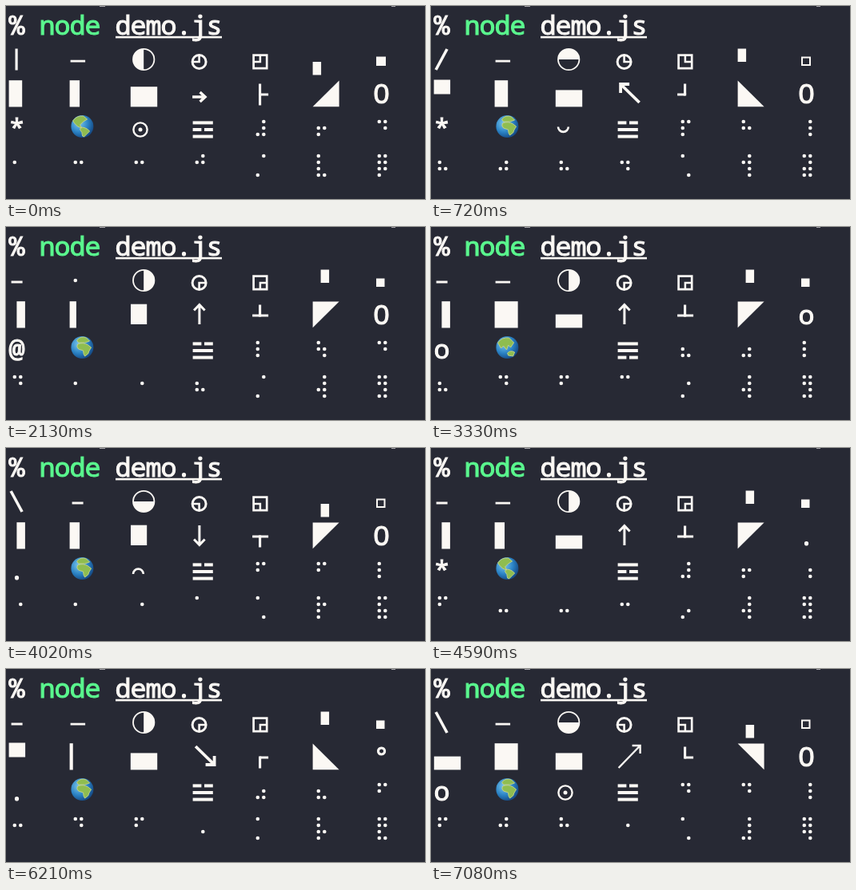
An HTML page for the animation above (7.2 s loop, 524 by 242 pixels).

```html
<!DOCTYPE html>
<html lang="en">
<head>
<meta charset="utf-8">
<title>Terminal spinners</title>
<style>
  html, body { margin: 0; width: 100%; height: 100%; overflow: hidden; background: #272934; }
  svg { display: block; width: 524px; height: 242px; }
  text {
    font: 33.4px "Noto Sans Mono", "DejaVu Sans Mono", monospace; letter-spacing: -1.04px;
    fill: currentColor; stroke: currentColor; stroke-width: 1.1px; color: #fbf8f4; white-space: pre;
  }
  .command { color: #5af78e; }
  .line { fill: none; stroke: #fbf8f4; }
  .solid { fill: #fbf8f4; }
</style>
</head>
<body>
<svg id="stage" viewBox="0 0 524 242">
  <defs>
    <radialGradient id="ocean" cx=".35" cy=".35" r=".75">
      <stop offset="0" stop-color="#7cc8ee"/>
      <stop offset=".55" stop-color="#2a82c4"/>
      <stop offset="1" stop-color="#123f78"/>
    </radialGradient>
  </defs>
  <rect width="524" height="242" fill="#272934"/>
  <path d="M117 0h7M482 0h5" stroke="#a5a4a8" stroke-width="2"/>
  <text x="3.5" y="36">%</text>
  <text x="41.5" y="36" class="command">node</text>
  <text x="136.5" y="36">demo.js</text>
  <rect class="solid" x="137" y="37.8" width="133" height="2.6"/>
</svg>
<script>
const LOOP = 7200, STEP = 30, COLUMNS = 7;
const stage = document.getElementById('stage');

const SPINNERS = [
  '|/-\\', '⠂-–—–-', '◐◓◑◒', '◴◷◶◵', '◰◳◲◱', '▖▘▝▗', '■□▪▫',
  '▌▀▐▄', '▉▊▋▌▍▎▏▎▍▌▋▊▉', '▁▃▄▅▆▇█▇▆▅▄▃', '←↖↑↗→↘↓↙', '┤┘┴└├┌┬┐', '◢◣◤◥', '.oO°Oo.',
  '.oO@*', '🌍🌎🌏', '◡◡ ⊙⊙ ◠◠', '☱☲☴', '⠋⠙⠹⠸⠼⠴⠦⠧⠇⠏', '⠋⠙⠚⠞⠖⠦⠴⠲⠳⠓', '⠄⠆⠇⠋⠙⠸⠰⠠⠰⠸⠙⠋⠇⠆',
  '⠋⠙⠚⠒⠂⠂⠒⠲⠴⠦⠖⠒⠐⠐⠒⠓⠋',
  '⠁⠉⠙⠚⠒⠂⠂⠒⠲⠴⠤⠄⠄⠤⠴⠲⠒⠂⠂⠒⠚⠙⠉⠁',
  '⠈⠉⠋⠓⠒⠐⠐⠒⠖⠦⠤⠠⠠⠤⠦⠖⠒⠐⠐⠒⠓⠋⠉⠈',
  '⠁⠁⠉⠙⠚⠒⠂⠂⠒⠲⠴⠤⠄⠄⠤⠠⠠⠤⠦⠖⠒⠐⠐⠒⠓⠋⠉⠈⠈',
  '⢄⢂⢁⡁⡈⡐⡠', '⢹⢺⢼⣸⣇⡧⡗⡏', '⣾⣽⣻⢿⡿⣟⣯⣷'
].map(s => [...s]);

// Glyphs are drawn from the left edge of the cell, with y = 0 on the baseline.
const rect = (x, y, w, h) => `<rect class="solid" x="${x}" y="${y}" width="${w}" height="${h}"/>`;
const line = (d, width = 3) => `<path class="line" stroke-width="${width}" d="${d}"/>`;
const solid = d => `<path class="solid" d="${d}"/>`;
const ring = (x, y, r, width) => `<circle class="line" cx="${x}" cy="${y}" r="${r}" stroke-width="${width}"/>`;
const turn = (angle, x, y, body) => `<g transform="rotate(${angle} ${x} ${y})">${body}</g>`;

const glyphs = {
  ' ': '',
  '|': line('M9.5 -25.5V1.5', 3.2),
  '/': line('M2.5 1L16.5 -25', 3.6),
  '\\': line('M2.5 -25L16.5 1', 3.6),
  '-': rect(3, -11.5, 14, 3),
  '–': rect(1, -11.3, 18.5, 2.8),
  '—': rect(1, -11.3, 18.5, 2.8),
  '■': rect(3.4, -15.5, 12, 11.5),
  '▪': rect(3.4, -14.5, 10.5, 10.5),
  '□': line('M4.4 -14.5h10v9.5h-10z', 2),
  '▫': line('M4.4 -14.5h9.5v9.5h-9.5z', 2),
  '▖': rect(0, -9, 10.5, 16.5),
  '▘': rect(0, -25.5, 10.5, 16.5),
  '▝': rect(10, -25.5, 10.5, 16.5),
  '▗': rect(10, -9, 10.5, 16.5),
  '▀': rect(0, -29.5, 20.5, 18),
  '▐': rect(9.8, -28.8, 10.5, 33.3),
  '█': rect(0.4, -25.3, 20.2, 25.3),
  '←': line('M3 -12H29M10 -18L3.5 -12L10 -6'),
  '→': line('M1.5 -8H17.5M11 -14L17.5 -8L11 -2', 3.4),
  '↑': line('M10.3 0V-24.5M3.5 -17.5L10.3 -24.5L17 -17.5'),
  '↓': line('M10.3 -25V-0.5M3.5 -7.5L10.3 -0.5L17 -7.5'),
  '↖': line('M29 -1L5.5 -24M5.5 -13V-24H16.5', 3.8),
  '↗': line('M3 2L30 -26M20 -26H30V-16', 2.4),
  '↘': line('M5.5 -25L29 -2M29 -13V-2H18', 3.8),
  '↙': line('M29 -25L5.5 -2M5.5 -13V-2H16.5', 3.8),
  '◢': solid('M0 4.3H33V-28.5Z'),
  '◣': solid('M0 -28.5V4.3H33Z'),
  '◤': solid('M0 4.3V-28.5H33Z'),
  '◥': solid('M0 -28.5H33V4.3Z'),
  '◡': line('M3.4 -13.5A6.4 6.4 0 0 0 16.2 -13.5', 2.6),
  '◠': line('M3.4 -7A6.4 6.4 0 0 1 16.2 -7', 2.6),
  '⊙': ring(12.4, -10, 8.6, 2.4) + '<circle class="solid" cx="12.4" cy="-10" r="2.5"/>'
};

[...'◐◓◑◒'].forEach((c, i) => {
  glyphs[c] = ring(16.6, -12, 13.2, 1.8) + turn(i * 90, 16.6, -12, solid('M16.6 -25A13 13 0 0 0 16.6 1Z'));
});
[...'◴◷◶◵'].forEach((c, i) => {
  glyphs[c] = ring(10, -9, 8.5, 3) + turn(i * 90, 10, -9, line('M10 -17V-9H2', 2.6));
});
[...'◰◳◲◱'].forEach((c, i) => {
  glyphs[c] = line('M2 -17.4h16.6v16.6h-16.6z', 2.7) + turn(i * 90, 10.3, -9.1, line('M10.3 -17V-9.1H2', 2.5));
});
[...'▏▎▍▌▋▊▉'].forEach((c, i) => { glyphs[c] = rect(0, -28.8, (i + 1) * 4.15, 33.3); });
[...'▁▂▃▄▅▆▇'].forEach((c, i) => {
  const height = (i + 1) * 4.2;
  glyphs[c] = rect(0.2, 4.4 - height, 33.4, height);
});

const ARMS = { u: 'V-24.5', d: 'V2.5', l: 'H0.5', r: 'H20.5' };
Object.entries({ '┤': 'udl', '┘': 'ul', '┴': 'ulr', '└': 'ur', '├': 'udr', '┌': 'dr', '┬': 'dlr', '┐': 'dl' })
  .forEach(([c, arms]) => {
    glyphs[c] = line([...arms].map(a => 'M10 -11' + ARMS[a]).join(''), 3.1) + rect(8.45, -12.55, 3.1, 3.1);
  });

[...'☱☲☴'].forEach((c, broken) => {
  glyphs[c] = [0, 1, 2].map(i => {
    const y = -20.6 + i * 8.6;
    return i === broken ? rect(2, y, 10.8, 4) + rect(16.4, y, 10.8, 4) : rect(2, y, 25.2, 4);
  }).join('');
});

const LAND = {
  '🌍': 'M9 -23Q14 -29 21 -26L25 -22L19 -20L11 -20ZM10 -18Q17 -21 23 -17L27 -14Q24 -10 23 -6L19 -3Q17 -5 17 -10L11 -12Q8 -15 10 -18Z',
  '🌎': 'M4 -21Q9 -28 17 -27L22 -23L17 -20L13 -16L15 -12L10 -14L6 -18ZM14 -13Q21 -13 25 -8Q22 -5 18 -1L16 -2Q16 -7 13 -10Z',
  '🌏': 'M4 -20Q9 -27 18 -26L24 -20L20 -14L17 -17L15 -11L11 -16L8 -13ZM16 -7Q20 -11 25 -8L23 -3L17 -4Z'
};
for (const c in LAND) {
  glyphs[c] = '<circle cx="15.8" cy="-14" r="14" fill="url(#ocean)"/>' +
    `<path d="${LAND[c]}" fill="#8fbd50" stroke="#c9d488" stroke-width=".9"/>`;
}

// Unicode braille bits: dots 1-3 left, 4-6 right, then 7 and 8 below.
function braille(code) {
  let dots = '';
  for (let bit = 0; bit < 8; bit++) {
    if (!(code >> bit & 1)) continue;
    const column = bit < 6 ? Math.floor(bit / 3) : bit - 6;
    const row = bit < 6 ? bit % 3 : 3;
    dots += `<circle class="solid" cx="${7.2 + column * 7.5}" cy="${-20 + row * 8}" r="2.3"/>`;
  }
  return dots;
}

function draw(c) {
  if (c in glyphs) return glyphs[c];
  const code = c.codePointAt(0) - 0x2800;
  return code >= 0 && code < 256 ? braille(code) : `<text>${c}</text>`;
}

const cells = SPINNERS.map((frames, i) => {
  const node = document.createElementNS('http://www.w3.org/2000/svg', 'g');
  const row = Math.floor(i / COLUMNS);
  node.setAttribute('transform', `translate(${3.6 + i % COLUMNS * 76} ${79 + row * 43})`);
  stage.append(node);
  return { node, frames, row, shown: null };
});

// The ticks run slightly unevenly: [time in ms, tick].
const TICKS = [[30, 5], [750, 10], [2190, 19], [3240, 26], [3420, 27], [4620, 35], [5400, 41], [6990, 51], [7200, 52]];

function tickAt(t) {
  let i = 0;
  while (i < TICKS.length - 2 && t >= TICKS[i + 1][0]) i++;
  const [t0, n0] = TICKS[i], [t1, n1] = TICKS[i + 1];
  return Math.floor(n0 + (t - t0) / (t1 - t0) * (n1 - n0) + 1e-6);
}

// Each row is redrawn one step after the row above it.
function render(time) {
  const t = Math.floor(time % LOOP / STEP) * STEP;
  for (const cell of cells) {
    const c = cell.frames[tickAt(t - cell.row * STEP) % cell.frames.length];
    if (c === cell.shown) continue;
    cell.shown = c;
    cell.node.innerHTML = draw(c);
  }
}

const start = performance.now();
function loop() {
  render(performance.now() - start);
  requestAnimationFrame(loop);
}
loop();
</script>
</body>
</html>
```
